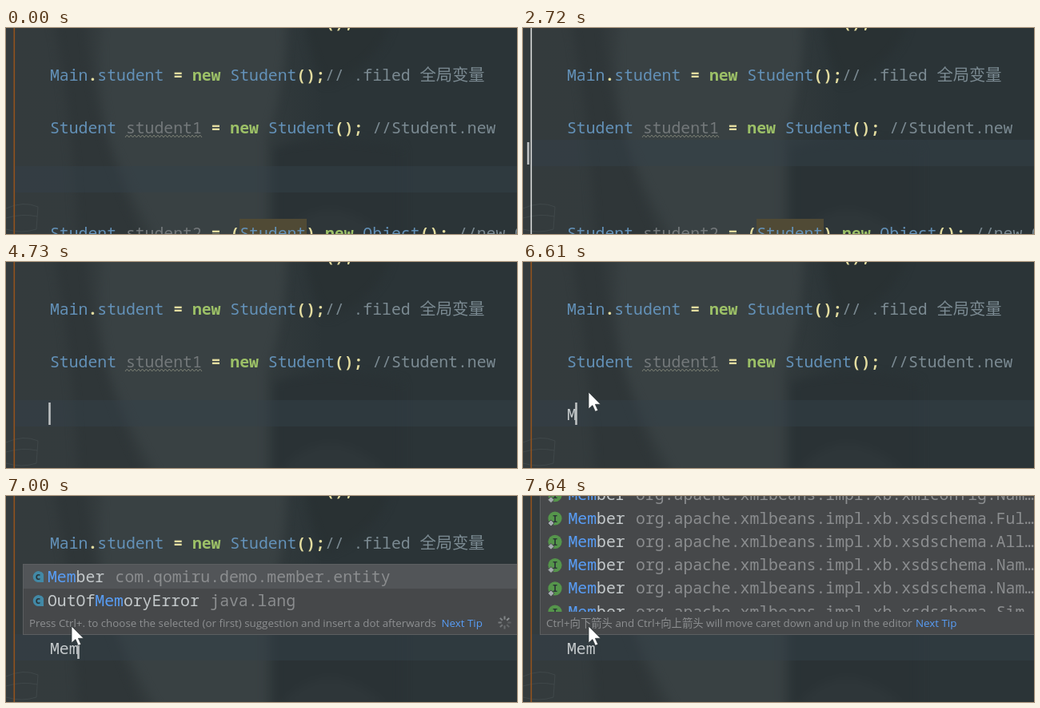
An HTML page for the animation above (8 s loop, 639 by 258 pixels).

```html
<!DOCTYPE html>
<html lang="en">
<head>
<meta charset="utf-8">
<title>Code completion</title>
<style>
  html, body { margin: 0; width: 100%; height: 100%; overflow: hidden; background: #2c3437; }
  svg { display: block; width: 639px; height: 258px; }
  text { white-space: pre; }
  .code { font: 500 19.78px "Noto Sans Mono", "DejaVu Sans Mono", monospace; }
  .cjk { font: 300 20.3px "Noto Sans CJK SC", "Noto Sans CJK", sans-serif; }
  .tip { font: 13.35px "Open Sans", "Noto Sans", "Noto Sans CJK SC", sans-serif; fill: #8d8f91; }
  .type { fill: #6391b8; }
  .op { fill: #e4dda0; font-weight: 600; }
  .key { fill: #9cc067; font-weight: 700; }
  .note { fill: #7b8a92; }
  .dim { fill: #73787a; }
  .plain { fill: #c4c9cb; }
  .pkg { fill: #8b8d8f; }
  .hit, .link { fill: #589df6; }
  .link { font-weight: 500; }
</style>
</head>
<body>
<svg viewBox="0 0 639 258">
  <defs>
    <linearGradient id="base">
      <stop offset="0" stop-color="#343b3d"/>
      <stop offset=".5" stop-color="#333b3d"/>
      <stop offset=".62" stop-color="#2b3437"/>
      <stop offset="1" stop-color="#2b3437"/>
    </linearGradient>
    <filter id="soft" x="-20%" y="-20%" width="140%" height="140%" color-interpolation-filters="sRGB">
      <feGaussianBlur stdDeviation="6"/>
    </filter>
    <clipPath id="rows"><rect x="22" width="617" height="145"/></clipPath>
  </defs>

  <rect width="639" height="258" fill="url(#base)"/>
  <g filter="url(#soft)">
    <path d="M120-10H350Q350 70 325 140L325 268H190Q150 200 128 130Q112 60 120-10Z" fill="#394143"/>
    <path d="M60-10H100Q105 70 122 130Q140 200 175 268H90Q85 130 60-10Z" fill="#2f3638"/>
    <path d="M375-10H480Q470 45 400 70Q380 40 375-10Z" fill="#293133"/>
    <path d="M335 150Q400 130 495 150V268H335Z" fill="#2a3235"/>
    <path d="M340 266Q400 190 480 266Z" fill="#2e3639"/>
  </g>
  <path d="M0 226Q22 216 40 224L38 252Q20 258 0 252M0 238Q20 232 39 236" fill="none" stroke="#4a5254" opacity=".55"/>

  <rect id="active" x="11" width="628" height="33" fill="#33404a" opacity=".45"/>
  <rect id="margin" x="9.5" width="1.6" height="258"/>
  <g id="code" class="code"></g>
  <text id="typed" class="code plain" x="55" y="197.5"></text>
  <g id="popups"></g>
  <rect id="caret" width="2.6" fill="#bcc0c1"/>

  <circle id="click" cx="81.5" cy="163.5" r="15.3" fill="#ff0" opacity=".45"/>
  <path id="beam" d="M-5-10H-2L0-8 2-10H5M0-8V8M-5 10H-2L0 8 2 10H5" fill="none" stroke="#c6c8c9" stroke-width="1.8"/>
  <path id="arrow" d="M82 163V184L86.9 179.6 90.4 187.3 93.8 185.8 90.4 178.3H97Z" fill="#fff" stroke="#30383a" stroke-width=".8"/>
</svg>

<script>
const LOOP = 8000, CELL = 11.87;
const $ = id => document.getElementById(id);
const show = (id, on) => $(id).setAttribute('visibility', on ? 'visible' : 'hidden');
const set = (id, attrs) => { for (const k in attrs) $(id).setAttribute(k, attrs[k]); };

// Each part is "class|text".
const spans = parts => parts.map(p => {
  const i = p.indexOf('|');
  return `<tspan class="${p.slice(0, i)}">${p.slice(i + 1)}</tspan>`;
}).join('');
const line = (x, y, ...parts) => `<text x="${x}" y="${y}">${spans(parts)}</text>`;

$('code').innerHTML =
  line(55 + 29 * CELL, -0.5, 'op|();', 'note|//') +
  line(55, 65.5, 'type|Main', 'op|.', 'type|student', 'op| = ', 'key|new', 'type| Student', 'op|();',
    'note|// .filed ', 'note cjk|全局变量') +
  line(55, 131.5, 'type|Student ', 'dim|student1', 'op| = ', 'key|new', 'type| Student', 'op|(); ',
    'note|//Student.new') +
  `<path d="M149 137${'l2.4-3 2.4 3'.repeat(20)}" fill="none" stroke="#7c8075"/>` +
  '<g id="cast"><rect x="292" y="239" width="84" height="19" fill="#504a35"/>' +
  line(55, 263.5, 'type|Student ', 'dim|student2', 'op| = (', 'type|Student', 'op|) ', 'key|new',
    'type| Object', 'op|(); ', 'note|//new O') + '</g>';

const letter = (y, size, glyph) =>
  `<text x="40" y="${y}" text-anchor="middle" style="font:700 ${size}px 'Noto Sans Mono',monospace" fill="#2b3437">${glyph}</text>`;
const classIcon = y =>
  `<path d="M47 ${y + 7}H39.5A7 7 0 1 1 47 ${y - 3}Z" fill="#4289a6"/>` + letter(y + 4, 12, 'c');
const typeIcon = y =>
  `<circle cx="40" cy="${y}" r="8.6" fill="#55954b"/>` + letter(y + 4.5, 12, 'I') +
  `<path d="M35 ${y + 2}l4 4-4 4-4-4z" fill="#a3aaae" stroke="#46484a"/>`;

const panel = (id, top, rows) =>
  `<g id="${id}"><rect x="21.5" y="${top}" width="620" height="${173.5 - top}" fill="#46484a" stroke="#5c5f61"/>${rows}</g>`;

// Name with its matched letters, then the package in its own column.
const entry = (x, y, name, hit, pkg) => {
  const [before, after] = name.split(hit);
  return line(x, y, 'plain|' + before, 'hit|' + hit, 'plain|' + after) +
    line(x + (name.length + 1) * CELL + 1.5, y, 'pkg|' + pkg);
};

const members = hit => {
  const tails = ['xmlconfig.Nam', 'xsdschema.Ful', 'xsdschema.All', 'xsdschema.Nam', 'xsdschema.Nam', 'xsdschema.Sim'];
  const rows = tails.map((tail, i) => {
    const y = -1.3 + i * 29.3;
    return typeIcon(y) + entry(56.5, y + 6.5, 'Member', hit, `org.apache.xmlbeans.impl.xb.${tail}…`);
  }).join('');
  return `<g class="code" clip-path="url(#rows)">${rows}</g>`;
};

const tip = (id, text, linkX) =>
  `<g id="${id}" class="tip"><text x="29" y="164">${text}</text><text class="link" x="${linkX}" y="164">Next Tip</text></g>`;

const spokes = Array.from({ length: 8 }, (_, i) =>
  `<path d="M0-3.8V-8" transform="rotate(${i * 45})" opacity="${0.25 + i * 0.07}"/>`).join('');

$('popups').innerHTML =
  panel('wide', -5, members('Me')) +
  panel('short', 85.5, '<rect x="22" y="86" width="617" height="30" fill="#525558"/><g class="code">' +
    classIcon(101) + entry(52, 107.5, 'Member', 'Mem', 'com.qomiru.demo.member.entity') +
    classIcon(131) + entry(52, 137.5, 'OutOfMemoryError', 'Mem', 'java.lang') + '</g>') +
  panel('full', -5, members('Mem')) +
  tip('tipDot', 'Press Ctrl+. to choose the selected (or first) suggestion and insert a dot afterwards', 544.5) +
  tip('tipMove', 'Ctrl+向下箭头 and Ctrl+向上箭头 will move caret down and up in the editor', 491) +
  `<g id="spinner" stroke="#a4a8aa" stroke-width="2">${spokes}</g>`;

// [time, x, y, height]; no x means hidden
const CARET = [
  [0], [2720, 5.2, 143, 28], [2950, 17.2, 143, 28], [3100, 29.2, 143, 28], [3250, 41, 143, 28],
  [3420, 53.2, 143, 28], [3660, 65.2, 143, 28], [4730, 53.2, 176, 28], [6060],
  [6460, 65.2, 176, 28], [6700, 77.2, 176, 28], [7000, 89.2, 180, 24], [7640]
];
const TYPED = [[0, ''], [6460, 'M'], [6700, 'Me'], [7000, 'Mem']];
const POPUP = [[0, ''], [6770, 'wide'], [7000, 'short'], [7090, 'full']];
const at = (table, t) => table.filter(row => row[0] <= t).pop();
const within = (t, a, b) => t >= a && t < b;

function render(t) {
  const [, x, y, h] = at(CARET, t);
  show('caret', x !== undefined);
  if (x !== undefined) set('caret', { x, y, height: h });

  const word = at(TYPED, t)[1];
  if ($('typed').textContent !== word) $('typed').textContent = word;

  set('active', { y: within(t, 990, 4730) ? 140 : 173 });
  set('margin', { fill: within(t, 2720, 2950) ? '#d9dbdb' : '#91531f' });
  show('cast', t < 4730);

  // The pointer glides in over nine discrete positions.
  const step = Math.min(8, Math.floor((t - 150) / 76.25));
  const ease = 1 - (1 - step / 8) ** 1.7;
  set('beam', { transform: `translate(${287 - 203 * ease} ${252 - 87 * ease})` });
  show('beam', within(t, 150, 2170));
  show('click', within(t, 990, 1240));
  show('arrow', t >= 6610);

  const popup = at(POPUP, t)[1];
  for (const id of ['wide', 'short', 'full']) show(id, id === popup);
  show('tipDot', popup === 'wide' || popup === 'short');
  show('tipMove', popup === 'full');
  show('spinner', within(t, 6770, 7330));
  set('spinner', { transform: `translate(623.5 158.5) rotate(${Math.floor((t - 6770) / 90) * 45})` });
}

const start = performance.now();
function tick() {
  render((performance.now() - start) % LOOP);
  requestAnimationFrame(tick);
}
tick();
</script>
</body>
</html>
```
